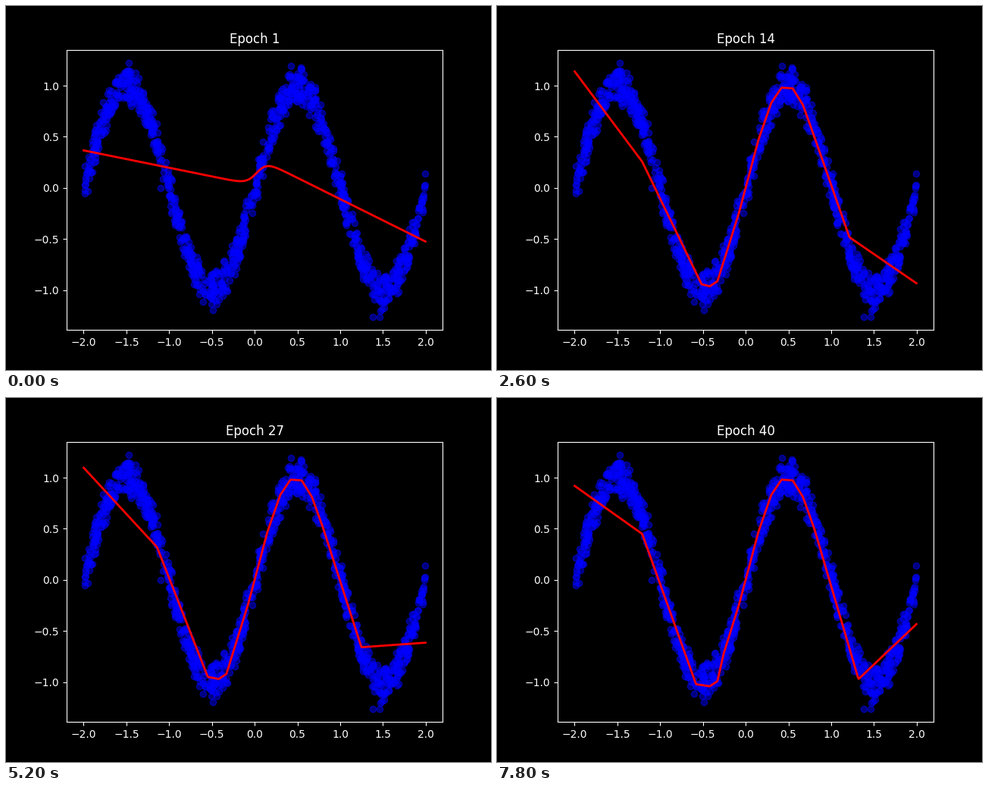
Recreate the animation shown at these times as a matplotlib script. Size 640x480 px, loop 8000 ms.

```python
import numpy as np
import matplotlib.pyplot as plt
from matplotlib.animation import FuncAnimation

EPOCHS = 40
INTERVAL = 200
SETTLED = 8          # from here on the fit only refines
X_LIM = (-2.199, 2.197)
Y_LIM = (-1.389, 1.352)

grid = np.linspace(-1.999, 1.997, 600)


def first_guess(x):
    """Two straight lines joined by a smooth step near zero."""
    left, right = 0.027 - 0.17 * x, 0.307 - 0.416 * x
    step = 1 / (1 + np.exp((0.035 - x) / 0.06))
    return left + (right - left) * step


def bent_fit(epoch):
    """Straight pieces that follow the sine and fold out at both ends."""
    s = max(0, epoch - SETTLED) / (EPOCHS - SETTLED)
    wobble = 0.04 * (np.sin(2 * np.pi * (epoch - 25) / 8) + 0.707)
    overshoot = 0.125 * np.clip(SETTLED - epoch, 0, 1)

    # Left arm down to the first trough
    depth = -1.04 + 0.35 * np.exp(-s * 8) + wobble
    arm_x = [-2, -1.21 + wobble, -0.5 - 0.08 * s, -0.42, -0.33]
    arm_y = [1.19 - 0.27 * s + wobble, 0.25 + 0.2 * s * s,
             depth + 0.02, depth, depth + 0.05]

    # Middle bends on a sine that runs slightly ahead on its way down
    mid_x = np.array([-0.26, -0.08, 0.15, 0.3, 0.42, 0.55, 0.67, 0.8])
    lead = 0.03 * np.clip(mid_x / 0.7, 0, 1)
    mid_y = np.maximum(np.sin(np.pi * (mid_x + lead)), depth + 0.05)

    # Right arm: swings up around a kink that sinks into the second trough
    tail_x = [1.21 + 0.11 * s * s, 2]
    tail_y = [-0.37 - 0.6 * s + wobble,
              -1.05 + 0.62 * s + wobble - overshoot]

    return np.interp(grid, np.concatenate([arm_x, mid_x, tail_x]),
                     np.concatenate([arm_y, mid_y, tail_y]))


def fit(epoch):
    """Ease quickly from the first guess to the bent fit."""
    t = min(1, (epoch - 1) / (SETTLED - 2))
    w = 1 - (1 - t) ** 2
    return (1 - w) * first_guess(grid) + w * bent_fit(epoch)


def samples(count=1000):
    """Noisy sine points, plus a few that stand clear of the band."""
    rng = np.random.default_rng(7)
    x = rng.uniform(grid[0], grid[-1], count)
    noise = rng.normal(0, 0.1, count)
    noise = np.where(np.abs(noise) > 0.2, noise / 2, noise)
    stray = [(0.42, 1.19), (1.38, -1.26), (1.46, -1.26), (1.47, -1.2),
             (-1.47, 1.225), (-1.1, 0), (1.997, 0.14), (-1.99, -0.05)]
    sx, sy = zip(*stray)
    return np.append(x, sx), np.append(np.sin(np.pi * x) + noise, sy)


plt.style.use("dark_background")
fig, ax = plt.subplots(figsize=(6.4, 4.8), dpi=100)
ax.set_xlim(*X_LIM)
ax.set_ylim(*Y_LIM)

ax.scatter(*samples(), color="blue", alpha=0.5)
line, = ax.plot(grid, fit(1), color="red", lw=2)
title = ax.set_title("Epoch 1")


def update(i):
    line.set_ydata(fit(i + 1))
    title.set_text(f"Epoch {i + 1}")
    return line, title


anim = FuncAnimation(fig, update, frames=EPOCHS, interval=INTERVAL,
                     repeat=True, repeat_delay=0)
plt.show()
```
